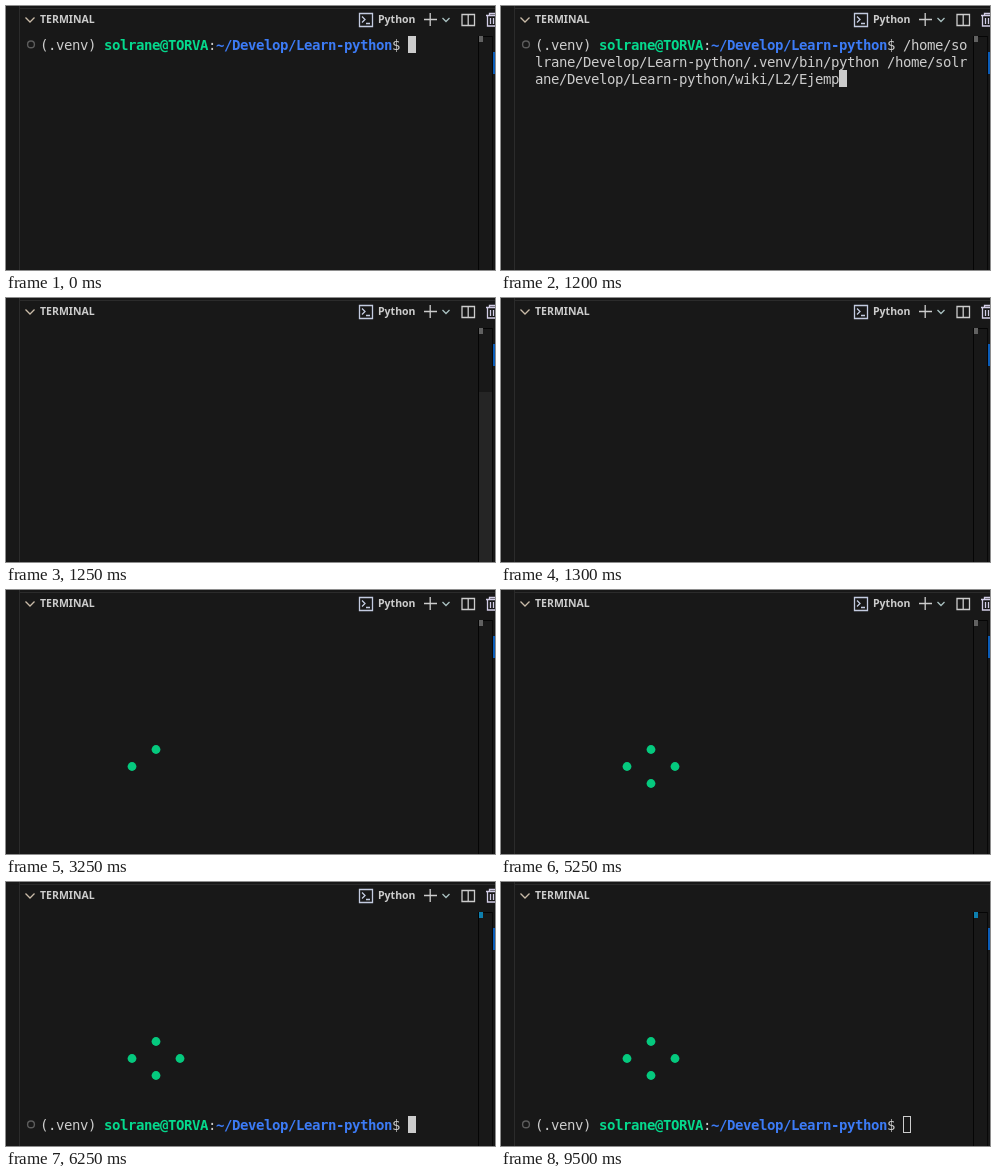
An HTML page with a canvas for the animation above (9.55 s loop, 489 by 264 pixels).

```html
<!DOCTYPE html>
<html lang="en">
<head>
<meta charset="utf-8">
<title>Terminal</title>
<style>
  html, body { margin: 0; width: 100%; height: 100%; overflow: hidden; background: #181818; }
  canvas { display: block; }
</style>
</head>
<body>
<canvas id="stage" width="489" height="264"></canvas>
<script>
const ctx = document.getElementById('stage').getContext('2d');

const LOOP = 9550;
const COLUMNS = 54, CELL_W = 8, CELL_H = 17, LEFT = 34, TOP = 30, BASELINE = 14;
const COLOR = {
  panel: '#181818', border: '#2b2b2b', text: '#cccccc', green: '#05d98d',
  blue: '#3c7bf5', dot: '#05c97e', slider: '#252525', mark: '#616161',
  done: '#0e7fae', edge: '#0a5cb8'
};
const USER = 'solrane';
const PROJECT = `/home/${USER}/Develop/Learn-python`;
const PROMPT = [
  ['(.venv) ', COLOR.text],
  [`${USER}@TORVA`, COLOR.green, true],
  [':', COLOR.text],
  ['~/Develop/Learn-python', COLOR.blue, true],
  ['$ ', COLOR.text]
];
const COMMAND = [`${PROJECT}/.venv/bin/python ${PROJECT}/wiki/L2/Ejemp`, COLOR.text];

// Each dot appears at its time in a terminal cell.
const DOTS = [
  { at: 2250, col: 14, row: 7 },
  { at: 3250, col: 11, row: 8 },
  { at: 4250, col: 17, row: 8 },
  { at: 5250, col: 14, row: 9 }
];

const between = (t, from, to) => t >= from && t < to;

function rect(x, y, w, h, color) {
  ctx.fillStyle = color;
  ctx.fillRect(x, y, w, h);
}

function stroke(path, color = COLOR.text, width = 1.3) {
  ctx.strokeStyle = color;
  ctx.lineWidth = width;
  ctx.stroke(new Path2D(path));
}

function label(text, x) {
  ctx.font = 'bold 10.5px "Noto Sans", "Open Sans", sans-serif';
  ctx.fillStyle = COLOR.text;
  ctx.fillText(text, x, 17);
}

// Writes coloured runs on the character grid, wrapping lines, and returns the next cell.
function write(runs, row) {
  let cell = row * COLUMNS;
  for (const [text, color, bold] of runs) {
    ctx.font = `${bold ? 'bold ' : ''}14px "DejaVu Sans Mono", monospace`;
    ctx.fillStyle = color;
    for (const char of text) {
      const x = LEFT + cell % COLUMNS * CELL_W;
      const y = TOP + Math.floor(cell / COLUMNS) * CELL_H;
      ctx.fillText(char, x, y + BASELINE);
      cell++;
    }
  }
  return cell;
}

function drawCursor(cell, focused) {
  const x = LEFT + cell % COLUMNS * CELL_W;
  const y = TOP + Math.floor(cell / COLUMNS) * CELL_H;
  if (focused) return rect(x, y, CELL_W, CELL_H, COLOR.text);
  ctx.strokeStyle = COLOR.text;
  ctx.lineWidth = 1;
  ctx.strokeRect(x + .5, y + .5, CELL_W - 1, CELL_H - 1);
}

function drawPrompt(row, extra, focused) {
  ctx.beginPath();
  ctx.arc(25, TOP + 8.4 + row * CELL_H, 3.4, 0, Math.PI * 2);
  ctx.strokeStyle = '#5c5c5c';
  ctx.lineWidth = 1.4;
  ctx.stroke();
  drawCursor(write([...PROMPT, ...extra], row), focused);
}

function drawActions() {
  stroke('M353.5 7.5h13v13h-13z', '#c3cbe0');
  stroke('M356 10.5l3 3-3 3M360 17.5h4', '#c3cbe0');
  label('Python', 372);
  stroke('M418 13.5h13M424.2 7v13');
  stroke('M436.5 12l3.5 3.5 3.5-3.5', '#a9c0c0');
  stroke('M456 8.5h12.5v11h-12.5zM462.2 8.5v11');
  stroke('M480 9.5h9M483.5 9.5v-2h5.5M481.5 9.5v10.5h7.5M484.5 12v6M487.5 12v6', '#d2cde6');
}

function drawFrame(t) {
  rect(0, 0, 489, 264, COLOR.panel);
  rect(13, 0, 1, 264, COLOR.border);
  rect(14, 2, 475, 1, COLOR.border);

  stroke('M19.5 11.5l4.5 4.5 4.5-4.5', '#c9bba8');
  label('TERMINAL', 34);
  const focused = t < 9500;
  if (focused) drawActions();

  const sliderShown = between(t, 1250, 1300) || between(t, 2200, 2250);
  if (sliderShown) rect(473, 94, 13, 170, COLOR.slider);
  rect(472, 30, 1, 234, '#050505');
  rect(472, 30, 14, 1, '#050505');
  rect(486, 30, 1, 234, '#080808');
  rect(487, 46, 2, 22, COLOR.edge);
  rect(473, 30, 4, 6, t < 6250 ? COLOR.mark : COLOR.done);

  for (const { at, col, row } of DOTS) {
    if (t < at) continue;
    ctx.beginPath();
    ctx.arc(LEFT + (col + .5) * CELL_W, TOP + row * CELL_H + 10.5, 4.4, 0, Math.PI * 2);
    ctx.fillStyle = COLOR.dot;
    ctx.fill();
  }

  if (t < 1250) drawPrompt(0, t < 1200 ? [] : [COMMAND], true);
  if (t >= 6250) drawPrompt(12, [], focused);
}

const start = performance.now();
function tick() {
  drawFrame((performance.now() - start) % LOOP);
  requestAnimationFrame(tick);
}
tick();
</script>
</body>
</html>
```
